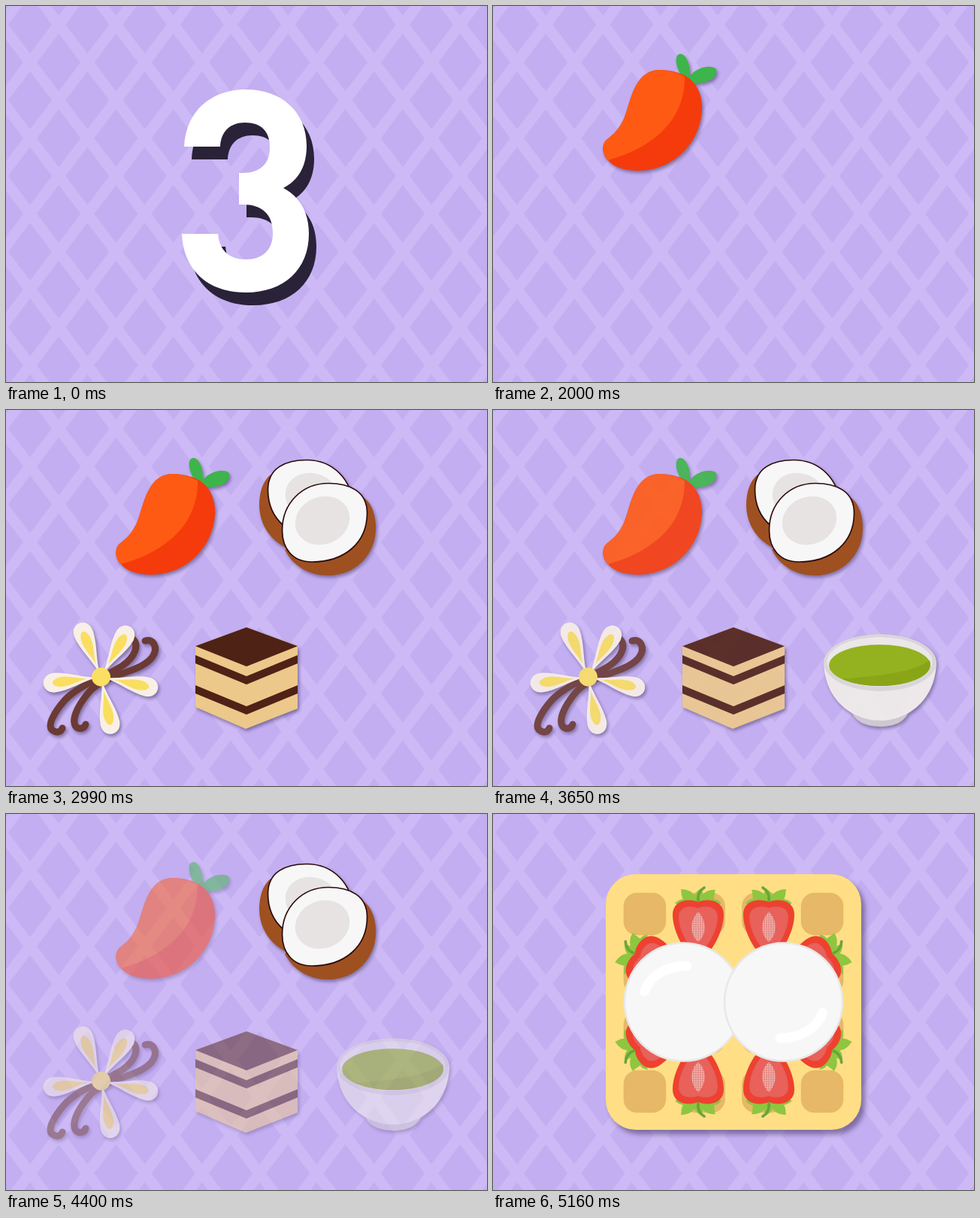
Write an HTML page that moves like this. It is 640 by 500 pixels and loops after 7760 ms.

```html
<!DOCTYPE html>
<html lang="en">
<head>
<meta charset="utf-8">
<title>Choose your favorite ice cream</title>
<style>
  html, body { margin: 0; width: 100%; height: 100%; overflow: hidden; background: #c3aef1; }
  svg { display: block; width: 640px; height: 500px; }
  .scene { visibility: hidden; }
  .item { filter: drop-shadow(2.5px 3px 2.2px rgba(30, 20, 55, .42)); }
  .slab { filter: drop-shadow(5px 6px 3px rgba(30, 20, 55, .42)); }
  text { font: 400 60px Roboto, "Open Sans", sans-serif; letter-spacing: .3px; fill: #fff; text-anchor: middle; }
</style>
</head>
<body>
<svg viewBox="0 0 640 500">
  <defs>
    <path id="three" d="M237 187C239 140 273 111 319 111C367 111 400 141 400 186C400 213 389 232 369 242C391 254 403 274 403 303C403 350 370 381 319 381C267 381 236 350 234 303L282 303C284 325 297 337 319 337C342 337 355 324 355 302C355 277 341 264 315 264L310 264L310 222L315 222C338 222 351 210 351 188C351 166 339 155 318 155C298 155 286 167 285 187Z"/>
    <g id="half">
      <path fill="#9f5020" d="M477 117C488 126 492 142 492 157C492 193 464 220 429 220C402 220 382 207 371 186Z"/>
      <path fill="#f7f7f7" stroke="#2a0b0a" stroke-width="1.7" d="M429 97.5C457 97.5 480.5 108 480.5 137C480.5 177 450 202 407 202C381 202 367.5 184 367.5 160C367.5 124 394 97.5 429 97.5Z"/>
      <ellipse cx="421" cy="147" rx="37" ry="31.5" fill="#e6e3e2" transform="rotate(-22 421 147)"/>
    </g>
    <g id="petal">
      <path fill="#f8efe6" d="M4 0C24 -2 45 -13 63 -13C82 -12 82 12 63 13C45 13 24 2 4 0Z"/>
      <path fill="#fade5f" d="M19 0C32 -2 42 -7 53 -6.500C69 -5 69 5 53 6.500C42 7 32 2 19 0Z"/>
    </g>
    <pattern id="seeds" width="3" height="3" patternUnits="userSpaceOnUse">
      <path fill="#e58a85" d="M0 0h3v3h-3z"/>
      <circle cx="1.5" cy="1.5" r=".9" fill="#f3c4bf"/>
    </pattern>
    <g id="berry">
      <path fill="#8ec63f" d="M242 119C247 114 250 114 253 113C250 109 251 104 250 100C258 100 265 103 268 108C270 104 273 101 277 99C279 102 279 105 279 107C284 102 290 100 296 101C294 106 295 110 294 113C298 113 301 115 304 119L273 126Z"/>
      <path fill="#ee4130" d="M273 117C283 112 307 113 307 134C307 158 288 190 273 196C258 190 239 158 239 134C239 113 263 112 273 117Z"/>
      <path fill="#e8615b" stroke="#dd4f49" stroke-dasharray="2 2" d="M273 125C282 121 299 122 299 137C299 155 285 180 273 186C261 180 247 155 247 137C247 122 264 121 273 125Z"/>
      <path fill="url(#seeds)" d="M273 130C285 142 284 161 273 170C262 161 261 142 273 130Z"/>
      <path fill="none" stroke="#6aa33a" stroke-width="3.6" stroke-linecap="round" d="M273 115C272 107 276 101 281 98"/>
    </g>
    <g id="pair">
      <use href="#berry"/>
      <use href="#berry" transform="translate(187 185) rotate(-60) translate(-273 -115)"/>
    </g>
    <path id="shine" fill="none" stroke="#fff" stroke-width="13" stroke-linecap="round" d="M201.500 236C208 217 228 202 258 202"/>
  </defs>

  <path fill="#c3aef1" d="M0 0h640v500H0z"/>
  <path id="lattice" fill="none" stroke="#ccb9f5" stroke-width="14.500"/>

  <g class="scene" id="count" role="img" aria-label="3">
    <use href="#three" x="10" y="17" fill="#2a2238"/>
    <use href="#three" fill="#fff"/>
  </g>

  <g class="scene" id="banner">
    <path class="slab" fill="#2a2238" d="M0 118h660v264H0z"/>
    <text x="318.500" y="197.500">Choose your</text>
    <text x="318.500" y="269.500">favorite</text>
    <text x="318.500" y="341.500">ice cream</text>
  </g>

  <g class="scene item" id="mango">
    <path fill="#3db54a" d="M258 98C245 92 239 66 248 64C257 62 265 82 261 97ZM259 101C262 83 290 76 297 84C300 100 275 106 259 101Z"/>
    <path fill="#f53b0b" d="M222 85C236 85 250 89 258 94C272 103 279 120 278 138C276 182 240 219 193 219C176 219 160 214 153 205C145 198 144 184 151 178C160 171 168 164 175 148C183 130 187 85 222 85Z"/>
    <path fill="#ff5a14" d="M222 85C234 85 246 89 255 94C256 150 215 188 153 205C145 198 144 184 151 178C160 171 168 164 175 148C183 130 187 85 222 85Z"/>
  </g>

  <g class="scene item" id="coconut">
    <use href="#half" transform="translate(829 -31) scale(-1 1)"/>
    <use href="#half"/>
  </g>

  <g class="scene item" id="vanilla">
    <path fill="none" stroke="#6b3a34" stroke-width="9" stroke-linecap="round" d="M168 304C178 312 172 328 155 340C130 356 96 366 78 386C64 402 54 420 62 426C68 430 73 428 75 423M185 307C196 303 203 316 195 328C180 350 130 350 108 378C96 393 86 412 93 421C97 425 104 424 106 418"/>
    <g id="flower" transform="translate(126.500 355)"></g>
    <circle cx="126.500" cy="355" r="12.500" fill="#fadf63"/>
  </g>

  <g class="scene item" id="cake">
    <path fill="#edc88b" d="M252 314L320 289L388 314V397L319 424L252 395Z"/>
    <path fill="#4f2216" d="M252 314L320 289L388 314L320 341ZM252 326L320 354L388 326V337L320 365L252 337ZM252 366L320 394L388 366V377L320 405L252 377Z"/>
  </g>

  <g class="scene item" id="matcha">
    <path fill="#cfcbce" d="M477 400C481 415 498 421 515 421C533 421 549 415 553 400Z"/>
    <path fill="#f1efea" d="M440 336C442 390 482 413 515 413C548 413 588 390 590 336Z"/>
    <ellipse cx="515" cy="336" rx="75" ry="38" fill="#dddad7"/>
    <ellipse cx="514.500" cy="335" rx="70" ry="33" fill="#efedea"/>
    <ellipse cx="514.500" cy="339.500" rx="67.500" ry="27.500" fill="#8fb20a"/>
    <path fill="#83a400" d="M464 357.500C510 354 555 350 581 333C588 354 550 367 514 367C494 367 476 363 464 357.500Z"/>
  </g>

  <g class="scene" id="waffle">
    <rect class="slab" x="150" y="80" width="340" height="340" rx="40" fill="#ffde85"/>
    <g id="pits" fill="#e6b867"></g>
    <use href="#pair"/>
    <use href="#pair" transform="translate(640 0) scale(-1 1)"/>
    <use href="#pair" transform="translate(0 500) scale(1 -1)"/>
    <use href="#pair" transform="translate(640 500) scale(-1 -1)"/>
    <g fill="#f7f7f7" stroke="#e8e8e8" stroke-width="2.500">
      <circle cx="253.500" cy="250" r="78.500"/>
      <circle cx="386.500" cy="250" r="78.500"/>
    </g>
    <use href="#shine"/>
    <use href="#shine" transform="rotate(180 320 250)"/>
  </g>
</svg>
<script>
  const el = id => document.getElementById(id);

  // Background lattice: two families of parallel stripes
  const stepX = 76.29, slope = 100.7 / stepX;
  let d = "";
  for (let k = -8; k < 17; k++) {
    const x = 32 + stepX * k, dy = 600;
    for (const s of [1, -1]) {
      d += `M${x - s * dy / slope} ${75 - dy}L${x + s * dy / slope} ${75 + dy}`;
    }
  }
  el("lattice").setAttribute("d", d);

  el("flower").innerHTML = [-112, -60, 173, 12, 79]
    .map(a => `<use href="#petal" transform="rotate(${a})"/>`).join("");

  let pits = "";
  for (let i = 0; i < 16; i++) {
    const x = 173.7 + 78.7 * (i % 4), y = 104.7 + 78.7 * Math.floor(i / 4);
    pits += `<rect x="${x}" y="${y}" width="56.500" height="56.500" rx="18"/>`;
  }
  el("pits").innerHTML = pits;

  // [id, start, end] in ms
  const LOOP = 7760;
  const scenes = [
    ["count", 0, 500], ["banner", 500, 2000],
    ["mango", 2000, 5160], ["coconut", 2330, 5160], ["vanilla", 2660, 5160],
    ["cake", 2990, 5160], ["matcha", 3320, 5160], ["waffle", 5160, LOOP]
  ];
  const dimmed = ["mango", "vanilla", "cake", "matcha"];
  const blinks = [[4300, 4400], [4730, 4830]];
  const within = (t, a, b) => t >= a && t < b;

  function draw(t) {
    for (const [id, a, b] of scenes) {
      const off = id === "coconut" && blinks.some(([p, q]) => within(t, p, q));
      el(id).style.visibility = within(t, a, b) && !off ? "visible" : "hidden";
    }
    const steps = Math.max(0, Math.min(5, Math.floor((t - 3650) / 80) + 1));
    for (const id of dimmed) el(id).style.opacity = 1 - steps / 10;
  }

  const start = performance.now();
  function tick() {
    draw((performance.now() - start) % LOOP);
    requestAnimationFrame(tick);
  }
  tick();
</script>
</body>
</html>
```
